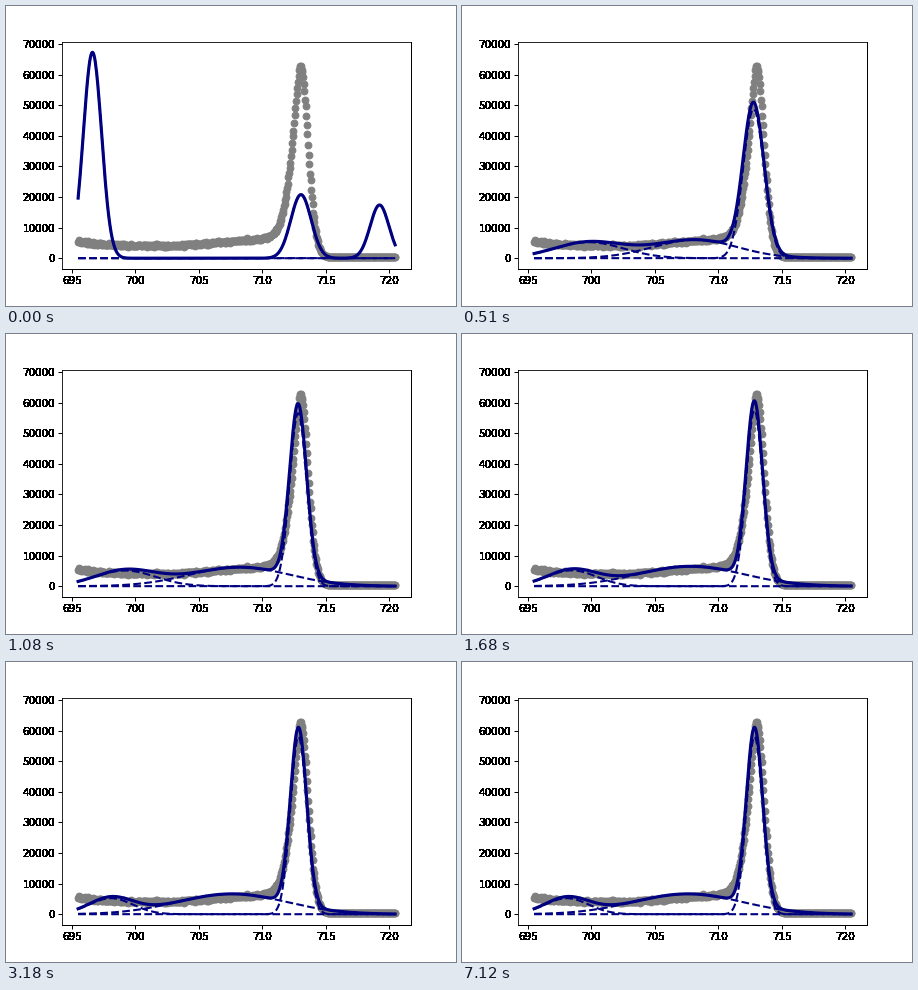
These frames come from a looping animation (450x300 px, 8390 ms). A matplotlib script:

```python
import numpy as np
import matplotlib.pyplot as plt
from matplotlib.animation import FuncAnimation

plt.rcParams.update({"font.family": "DejaVu Sans", "font.size": 10})

LOOP_MS = 8390
FRAMES = 280
NAVY = "navy"
TOTAL_AREA = 74500  # shared by the three peaks, in units of height * width


def sigmoid(t):
    return 1 / (1 + np.exp(-t))


def spectrum(x):
    """Sloping background with a step, plus a lopsided peak at 713."""
    slope = 3600 + 1500 * np.exp((695.5 - x) / 2) + 310 * np.maximum(x - 703, 0)
    background = 400 + slope * sigmoid((713.6 - x) / 0.2)
    dist = np.abs(x - 713.01)
    peak = np.where(x < 713.01,
                    np.exp(-(dist / 0.91) ** 1.5),
                    np.exp(-(dist / 0.85) ** 1.9))
    return background + 56200 * peak


def peaks_at(step):
    """Centre, width and height of the three peaks as the fit settles."""
    if step == 0:
        return [(696.62, 0.72, 67355), (713.05, 0.80, 20800), (719.24, 0.74, 17400)]
    early = sigmoid((13 - step) / 3)   # quick sharpening of the main peak
    drift = sigmoid((39 - step) / 12)  # slow spread of the two broad ones

    left = 8950 + 5800 * drift + 2100 * early
    middle = 28400 - 7000 * drift - 11400 * early
    areas = left, middle, TOTAL_AREA - left - middle
    centres = (698.07 + 2.0 * drift,
               707.60 + 1.1 * drift - 1.8 * early,
               712.86 - 0.06 * drift - 0.12 * early)
    widths = (1.71 + 1.2 * drift,
              4.27 - 0.6 * drift - 2.1 * early,
              0.64 + 0.05 * drift + 0.67 * early)
    return [(c, w, a / w) for c, w, a in zip(centres, widths, areas)]


def gauss(x, centre, width, height):
    return height * np.exp(-0.5 * ((x - centre) / width) ** 2)


def harden(image, dpi):
    """Turn soft glyph edges into solid black pixels."""
    image[..., :3] = 0
    image[..., 3] = image[..., 3] > 0.02
    return image, 0, 0


x = np.linspace(695.49, 720.47, 500)
rng = np.random.default_rng(4)
level = spectrum(x)
counts = level + rng.normal(size=x.size) * np.minimum(0.05 * level, 230)

fig = plt.figure(figsize=(6, 4), dpi=75, facecolor="white")
ax = fig.add_axes([0.125, 0.125, 0.775, 0.755])
ax.set_xlim(694.24, 721.72)
ax.set_ylim(-3368, 70723)
ax.set_xticks(range(695, 721, 5))
ax.set_yticks(range(0, 70001, 10000))
ax.tick_params(width=0.96, length=3.5)
ax.spines[["right", "bottom"]].set_linewidth(0.96)
for label in ax.get_xticklabels() + ax.get_yticklabels():
    label.set_agg_filter(harden)

ax.plot(x, counts, "o", color="gray", markersize=6.5, markeredgewidth=1)
parts = [ax.plot([], [], "--", color=NAVY, lw=2)[0] for _ in range(3)]
total, = ax.plot([], [], color=NAVY, lw=3)


def update(step):
    curves = [gauss(x, *peak) for peak in peaks_at(step)]
    for line, curve in zip(parts, curves):
        line.set_data(x, curve)
    total.set_data(x, sum(curves))
    return [*parts, total]


ani = FuncAnimation(fig, update, frames=FRAMES, interval=LOOP_MS / FRAMES,
                    repeat=True, repeat_delay=0, blit=False)
plt.show()
```
